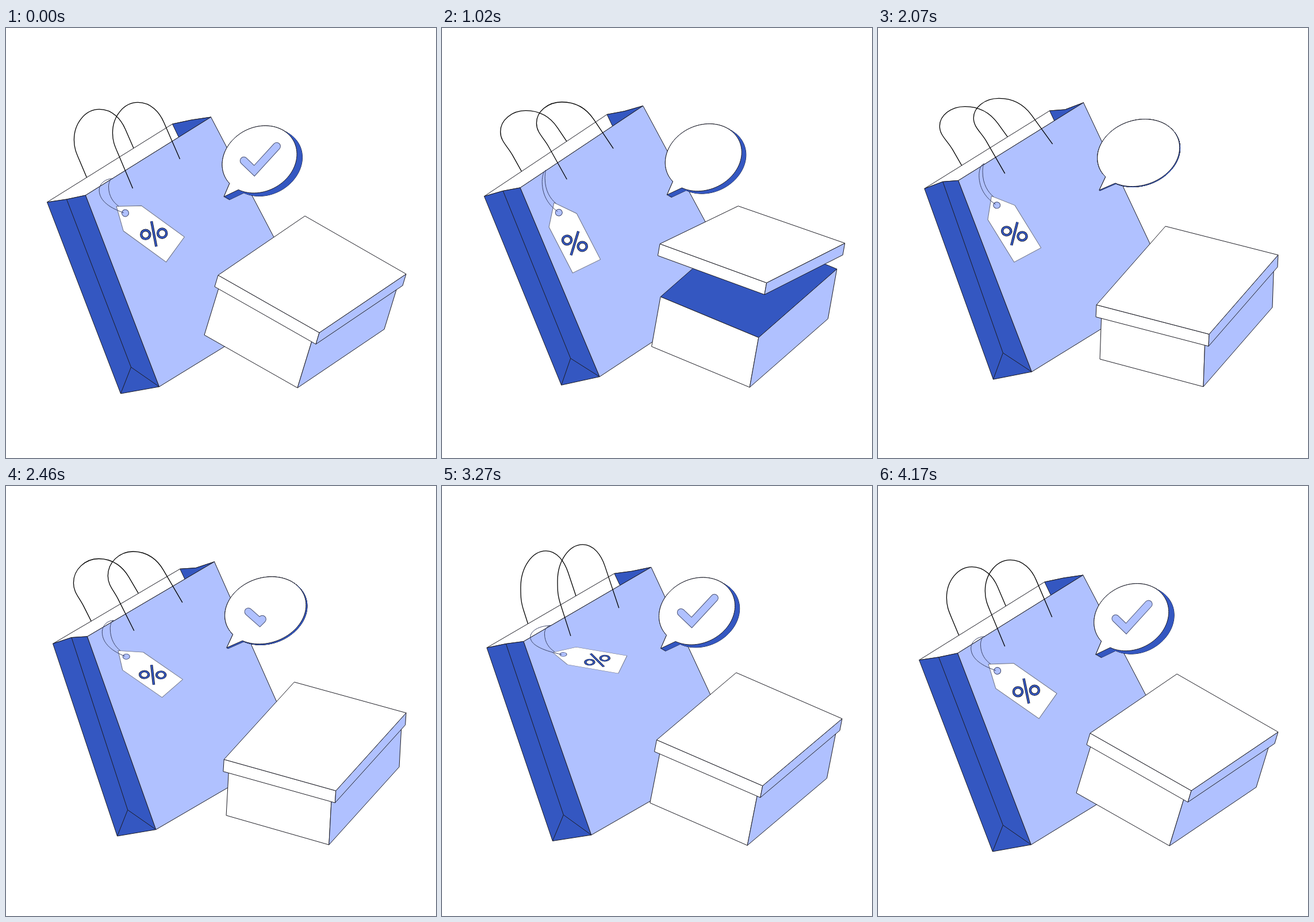
Write an HTML page with a canvas that moves like this. It is 748 px wide and 748 px high and loops after 4200 ms.

```html
<!DOCTYPE html>
<html lang="en">
<head>
<meta charset="utf-8">
<title>Shopping</title>
<style>
  html, body { margin: 0; width: 100%; height: 100%; overflow: hidden; background: #fff; }
  canvas { display: block; width: 748px; height: 748px; }
</style>
</head>
<body>
<canvas id="stage" width="748" height="748"></canvas>
<script>
const LOOP = 4200;
const LIGHT = '#b0c1ff', DARK = '#3457c1', WHITE = '#fff', INK = '#1c1c24', SOFT = '#3c4468';
const ctx = document.getElementById('stage').getContext('2d');
ctx.lineJoin = 'round';

// Corners as [x, y] at rest and [x, y] when fully turned.
// Bag corners are measured from its upper left corner.
const BAG = {
  fold: [34, -5, 32, -12],
  front: [67, -12, 59, -14],
  right: [285, -148, 277, -149],
  bottom: [195, 321, 186, 319],
  heel: [128, 333, 119, 332],
  crease: [146, 287, 136, 286],
  far: [449, 165, 427, 171],
  gripA: [149, -24, 140, -26],
  gripB: [231, -75, 223, -77],
  string: [114, -41, 104, -43]
};
const BOX = {
  left: [345, 534, 386, 576],
  front: [507, 626, 566, 624],
  right: [658, 524, 686, 486],
  up: [27, -88, 3, -85]
};
const LID = {
  left: [369, 430, 380, 482],
  front: [545, 530, 576, 533],
  right: [696, 428, 696, 395],
  back: [520, 327, 500, 345],
  down: [-6, 20, -1, 21]
};
const LIFT = { left: 87, front: 98, right: 35, back: 20, down: 0 };

let time, angle, turn;

function setClock(t) {
  time = t;
  angle = 2 * Math.PI * t / LOOP;
  turn = (1 - Math.cos(angle)) / 2;
}
// Looping motion: a mean with a first and a second harmonic.
const wave = (mean, c1, s1, c2 = 0, s2 = 0) => mean
  + c1 * Math.cos(angle) + s1 * Math.sin(angle)
  + c2 * Math.cos(2 * angle) + s2 * Math.sin(2 * angle);

const add = (a, b, k = 1) => [a[0] + b[0] * k, a[1] + b[1] * k];
const sub = (a, b) => add(a, b, -1);
const mix = (a, b, k) => a + (b - a) * k;
const ease = x => (1 - Math.cos(Math.PI * Math.min(1, Math.max(0, x)))) / 2;

function pose(corners, place = p => p) {
  const posed = {};
  for (const [name, [x0, y0, x1, y1]] of Object.entries(corners)) {
    posed[name] = place([mix(x0, x1, turn), mix(y0, y1, turn)], name);
  }
  return posed;
}

function trace(points) {
  points.forEach((p, k) => k ? ctx.lineTo(...p) : ctx.moveTo(...p));
}
function stroke(width = 1, color = INK) {
  ctx.lineWidth = width;
  ctx.strokeStyle = color;
  ctx.stroke();
}
function shape(points, fill, outline = INK) {
  ctx.beginPath();
  trace(points);
  ctx.closePath();
  ctx.fillStyle = fill;
  ctx.fill();
  if (outline) stroke(1, outline);
}
function line(...points) {
  ctx.beginPath();
  trace(points);
  stroke();
}

// Arch between two grips; sway leans its top sideways and lowers it.
function handle(s, e, sway) {
  const mid = [(s[0] + e[0]) / 2, (s[1] + e[1]) / 2];
  const rise = -154.5 - 0.95 * sway;
  const at = (x, y) => add(mid, [x, y]);
  const p = at(-50 + 0.45 * sway, -30), l = at(sway - 44, -71);
  const a = at(sway, rise), q = at(26 + 0.4 * sway, 0.72 * rise);
  const bend = 0.4 * (l[1] - p[1]) / (s[1] - p[1]);
  const fall = 0.5 * (a[1] - q[1]) / (e[1] - q[1]);
  ctx.beginPath();
  trace([s, p]);
  ctx.bezierCurveTo(...add(p, sub(s, p), bend), l[0], mix(l[1], p[1], 0.4), ...l);
  ctx.bezierCurveTo(l[0], mix(l[1], a[1], 0.55), mix(a[0], l[0], 0.55), a[1], ...a);
  ctx.bezierCurveTo(mix(a[0], q[0], 0.5), a[1], ...add(q, sub(e, q), fall), ...q);
  ctx.lineTo(...e);
  stroke(1.3, '#000');
}

function poseBag() {
  const corner = [wave(76.2, -4.7, -2.6), wave(288.2, 12, 7, 2.8, -1.5)];
  const tilt = wave(0, 0, 1.86, 0, -0.41) * Math.PI / 180;
  const sin = Math.sin(tilt), cos = Math.cos(tilt);
  const bag = pose(BAG, ([x, y]) => add(corner, [x * cos + y * sin, y * cos - x * sin]));
  return { corner, ...bag };
}

function drawBag({ corner, fold, front, right, bottom, heel, crease, far, gripA, gripB }) {
  const depth = sub(corner, front);
  const back = add(right, depth), backFold = add(right, sub(corner, fold));
  // where the inner edge meets the front rim
  const rim = (right[1] - front[1]) / (right[0] - front[0]);
  const dx = (front[1] + rim * (back[0] - front[0]) - back[1]) / (2.1 - rim);
  const inner = add(back, [dx, dx * 2.1]);
  const sway = wave(-39, 9.75, -13.3, -2.8, -1.9);

  handle(add(gripA, depth), add(gripB, depth), sway);
  shape([corner, fold, front, right, backFold, back], WHITE);
  shape([back, backFold, right, inner], DARK);
  shape([corner, fold, front, bottom, heel], DARK);
  line(fold, crease, bottom);
  line(crease, heel);
  shape([front, right, far, bottom], LIGHT);
  handle(gripA, gripB, sway);
}

function strand(top, bend, end) {
  const [dx, dy] = sub(end, bend);
  ctx.beginPath();
  ctx.moveTo(...top);
  ctx.bezierCurveTo(mix(top[0], bend[0], 0.55), top[1],
    bend[0], mix(bend[1], top[1], 0.55), ...bend);
  ctx.bezierCurveTo(bend[0], bend[1] + 0.5 * dy, end[0] - 0.5 * dx, end[1] - 0.18 * dy, ...end);
  stroke(1, SOFT);
}

function percent(width, color) {
  for (const side of [-1, 1]) {
    ctx.beginPath();
    ctx.arc(11 * side, 9.4 * side, 7.6, 0, 7);
    stroke(width, color);
  }
  ctx.beginPath();
  trace([[12.5, -18.5], [-12.5, 18.5]]);
  stroke(width, color);
}

function drawTag(top) {
  const degrees = wave(44, -11.5, 23.5, 3.5, -1.9);
  const squash = wave(0.866, 0.04, 0.198, 0.094);
  const swing = degrees * Math.PI / 180;
  const x = [Math.sin(swing), -squash * Math.cos(swing)];
  const y = [Math.cos(swing), squash * Math.sin(swing)];
  const hole = add(top, [22, 42 + 0.5 * degrees]);
  const local = (u, v) => add(add(hole, x, u), y, v);

  ctx.save();
  ctx.transform(...x, ...y, ...hole);
  shape([[0.5, -19.5], [27, 15.5], [27, 107.5], [-27, 107.5], [-27, 15.5]], WHITE, '#6a6f80');
  ctx.beginPath();
  ctx.arc(0, 0, 6, 0, 7);
  ctx.fillStyle = LIGHT;
  ctx.fill();
  stroke(1, SOFT);
  ctx.translate(0, 61.5);
  ctx.rotate(0.16);
  percent(4.4, INK);
  percent(2.8, DARK);
  ctx.restore();

  const slack = 0.6 * (75 - degrees);
  strand(top, add(top, [-slack, 20]), local(-1, -2.5));
  strand(top, add(top, [-0.3 * slack, 14]), local(3, -16.5));
}

function drawCheck(centre, w, h) {
  const shown = time < LOOP / 2 ? 1 - ease((time - 90) / 420) : ease((time - 2250) / 500);
  if (shown <= 0) return;
  const points = [[-0.42, 0.04], [-0.14, 0.34], [0.46, -0.39]]
    .map(([x, y]) => add(centre, [x * w, y * h]));
  const span = k => Math.hypot(...sub(points[k + 1], points[k]));
  ctx.save();
  ctx.lineCap = 'round';
  ctx.lineJoin = 'miter';
  if (shown < 1) ctx.setLineDash([(span(0) + span(1)) * shown, 999]);
  ctx.beginPath();
  trace(points);
  stroke(14, '#4a5274');
  stroke(12, LIGHT);
  ctx.restore();
}

function drawBubble() {
  const centre = [wave(448.5, -6, 5, -1.5, 1), wave(221.8, 5.75, 4, 0.95, 1.2)];
  const flat = turn * turn;
  const w = mix(65, 71.5, flat), h = 58.5;
  const depth = [mix(9.5, 1, flat), mix(5.5, 1, flat)];
  const outline = [];
  const from = 2.5, to = 2 * Math.PI + 2.17, tilt = 0.155;
  for (let k = 0; k <= 90; k++) {
    const a = mix(from, to, k / 90);
    outline.push(add(centre, [w * Math.cos(a), h * Math.sin(a - tilt)]));
  }
  outline.push(add(centre, [-0.953 * w, 1.11 * h]));

  const layers = Array.from({ length: 13 }, (_, k) => outline.map(p => add(p, depth, k / 12)));
  for (const layer of layers) shape(layer, DARK);
  for (const layer of layers) shape(layer, DARK, null);
  shape(outline, WHITE);
  drawCheck(centre, w, h);
}

function drawBox() {
  const { left, front, right, up } = pose(BOX);
  const [l, f, r] = [left, front, right].map(p => add(p, up));
  shape([l, f, r, sub(add(l, r), f)], DARK);
  shape([l, f, front, left], WHITE);
  shape([f, r, right, front], LIGHT);
}

function drawLid() {
  const half = Math.min(1, time / (LOOP / 2));
  const open = Math.sin(Math.PI * half ** 1.45) ** 2;
  const arc = 10 * Math.sin(angle) ** 2;
  const { left, front, right, back, down } = pose(LID, (p, name) =>
    name === 'down' ? p : add(p, [6 * open, -arc - LIFT[name] * open]));
  const drop = p => add(p, down);
  shape([left, front, drop(front), drop(left)], WHITE);
  shape([front, right, drop(right), drop(front)], LIGHT);
  shape([left, front, right, back], WHITE);
}

const start = performance.now();
function frame() {
  setClock((performance.now() - start) % LOOP);
  ctx.fillStyle = WHITE;
  ctx.fillRect(0, 0, 748, 748);
  const bag = poseBag();
  drawBag(bag);
  drawTag(bag.string);
  drawBubble();
  drawBox();
  drawLid();
  requestAnimationFrame(frame);
}
frame();
</script>
</body>
</html>
```
